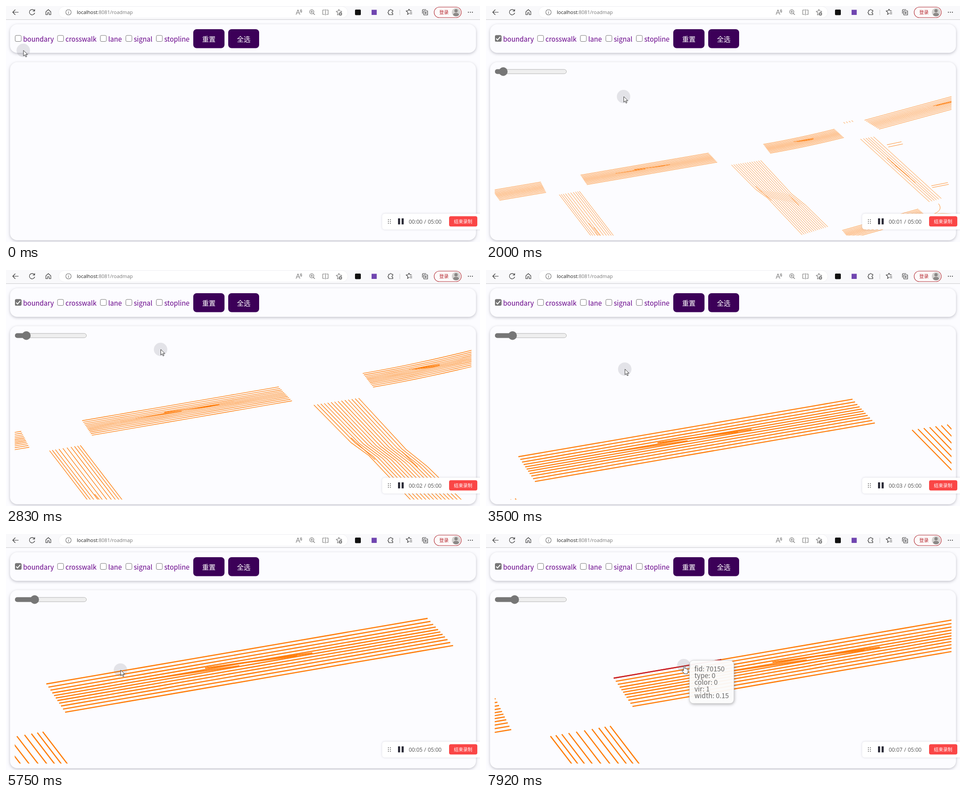
These frames come from a looping animation (1058x529 px, 8000 ms). An HTML page:

```html
<!DOCTYPE html>
<html lang="zh-CN">
<head>
<meta charset="utf-8">
<title>roadmap</title>
<style>
html, body { margin: 0; width: 100%; height: 100%; overflow: hidden; background: #fcfcff; }
svg { display: block; width: 1058px; height: 529px; }
text { font-family: "Noto Sans CJK SC", "Noto Sans", sans-serif; white-space: pre; }
.ui { font-family: "Open Sans", "Noto Sans", sans-serif; }
.panel { fill: #fcfcff; filter: drop-shadow(0 2px 3px rgba(40, 40, 60, .28)); }
.label { font-size: 15px; fill: #660088; }
.button { fill: #3c0058; }
.icon { fill: none; stroke: #333; stroke-width: 1.15; stroke-linecap: round; stroke-linejoin: round; }
.soft { stroke: #777; }
.box { fill: #fff; stroke: #767676; }
#roads { fill: none; stroke: #ff7f0e; stroke-width: .88; }
#tip rect { fill: #fff; fill-opacity: .94; stroke: #ccc; stroke-width: .7; filter: drop-shadow(1px 2px 3px rgba(0, 0, 0, .3)); }
#tip text { font-size: 15px; fill: #666; }
</style>
</head>
<body>
<svg viewBox="0 0 1058 529">
  <defs><clipPath id="mapArea"><rect x="19.5" y="158" width="1019.5" height="356.5"/></clipPath></defs>

  <rect width="1058" height="30" fill="#f9f9fb"/>
  <path d="M0 30.5H1058" stroke="#c9c9cc"/>
  <rect x="117.5" y="1" width="645.5" height="26" rx="13" fill="#fff" stroke="#f0f0f2"/>
  <g class="icon">
    <path d="M27.5 14H15.5M20.5 8.5 15 14l5.500 5.500"/>
    <path d="M63.5 11A6 6 0 1 0 64 15.5M64 7.500v4h-4"/>
    <path d="M89 13l5.500-5 5.500 5v6.500h-3.700v-4.500h-3.600v4.500H89z"/>
    <g class="soft">
      <circle cx="139.5" cy="14" r="6"/>
      <path d="M139.5 13.300v3.700M139.500 11v.1"/>
      <path d="M647.5 19l4.200-10.500L656 19M649 15.500h5.500M656.500 9q2 2 1 5M658.500 7.500q2.500 3 1 7"/>
      <circle cx="682.5" cy="13" r="4.700"/>
      <path d="M686 16.500l3 3M680 13h5M682.500 10.500v5"/>
      <path d="M711 9h-4v10h4M715 9h4v10h-4M713 7.500v13"/>
      <path d="M745 19l-5.500 1 1.500-4.500-4-3.500 4.500-.7L743 7.500l2 3.800 4.500.7-2 2"/>
    </g>
    <path d="M854 9.500h3q0-2 1.700-2t1.700 2h3v3q-2 0-2 2t2 2v3h-9v-3q-1.800 0-1.800-2t1.800-2z"/>
    <path d="M900 16.500l-4 2.500 1-4.500-4-3.500 4.500-.5 2-3.500 2 3.500H905M902 14h4M902 17.500h4"/>
    <path d="M929.5 16.500v-7q0-1.500 1.500-1.500h6.500M932.500 11h8.500v9h-8.500zM936.700 13.300v4.400M934.500 15.500h4.400"/>
  </g>
  <circle cx="746.5" cy="17.8" r="3.7" fill="#777"/>
  <path d="M744.5 17.800h4M746.500 15.800v4" stroke="#fff"/>
  <rect x="779" y="8" width="13" height="12.5" rx="2" fill="#111"/>
  <rect x="816" y="8.5" width="11.5" height="11.5" fill="#7045b0"/>
  <path d="M879 8.500v12" stroke="#ccc"/>
  <rect x="955.7" y="2.5" width="60.5" height="23.5" rx="11.7" fill="#fdfafa" stroke="#b5343c" stroke-width="1.2"/>
  <text x="967" y="18" font-size="10.5" fill="#b5262e">登录</text>
  <circle cx="1004.5" cy="14" r="9.5" fill="#d4d2d0"/>
  <path d="M998 20.500q0-5 6.500-5t6.500 5q-6 5-13 0" fill="#8a8886"/>
  <circle cx="1004.5" cy="10.8" r="3.7" fill="#8a8886"/>
  <path d="M1032 14h.1M1036.500 14h.1M1041 14h.1" stroke="#333" stroke-width="2.2" stroke-linecap="round"/>
  <text class="ui" x="158" y="18" font-size="11" fill="#222">localhost<tspan fill="#777">:8081/roadmap</tspan></text>

  <rect class="panel" x="9" y="41" width="1040" height="64" rx="16"/>
  <rect class="panel" x="9" y="126" width="1040" height="399" rx="16"/>
  <g id="checks"></g>
  <g id="tick">
    <rect x="20" y="65.5" width="14.5" height="14.5" rx="2.5" fill="#767676"/>
    <path d="M22.8 73l3 3.200 6-7" fill="none" stroke="#fff" stroke-width="2"/>
  </g>
  <rect class="button" x="418" y="52" width="69.7" height="42.4" rx="7.5"/>
  <rect class="button" x="496" y="52" width="69" height="42.4" rx="7.5"/>
  <g font-size="15" fill="#fff"><text x="437.8" y="79.5">重置</text><text x="515.5" y="79.5">全选</text></g>

  <g id="view">
    <rect x="20.5" y="142.2" width="159" height="9.6" rx="4.8" fill="#efefef" stroke="#b2b2b2"/>
    <rect id="fill" x="20" y="141.7" height="10.6" rx="5" fill="#767676"/>
    <circle id="knob" cy="147" r="9.7" fill="#767676"/>
    <g clip-path="url(#mapArea)"><g id="roads"></g></g>
  </g>

  <g id="tip"><rect width="99" height="96.5" rx="9"/></g>

  <rect x="839.5" y="465.5" width="230" height="35.5" rx="6" fill="#fff" style="filter:drop-shadow(0 0 2px rgba(60,60,90,.2))"/>
  <path d="M853.5 479h.1M858 479h.1M853.5 483h.1M858 483h.1M853.5 487h.1M858 487h.1" stroke="#555" stroke-width="1.9" stroke-linecap="round"/>
  <path d="M875 476h4.700v13.500H875zM883 476h4.700v13.500H883z" fill="#2c2c38"/>
  <g class="clock" font-size="12" fill="#555"><text class="ui" id="clock" x="899" y="487.5"></text><text class="ui" x="933.3" y="487.5">/</text><text class="ui" x="941.5" y="487.5">05:00</text></g>
  <rect x="989" y="471.3" width="63" height="23" rx="4" fill="#fa4646"/>
  <text x="999.7" y="487" font-size="10.3" fill="#fff">结束录制</text>

  <g id="pointer">
    <circle r="15" fill="#787884" fill-opacity=".19"/>
    <path id="arrow" d="M.5 0V12.500l3-2.700 2.200 5 2-.9-2.200-4.800h4z" fill="#fff" stroke="#222" stroke-width=".9"/>
    <path id="hand" d="M-.5 1.500q1.500-1.500 2.800 0v5q2.200-.8 2.600.7 2-.4 2.500.9 2-.2 2.100 1.400v3.500q0 2-1.500 4v1.300H.7V17Q-1.500 15-4 11q.7-1.800 3.500.5z" fill="#fff" stroke="#222" stroke-width=".9"/>
  </g>
</svg>
<script>
const $ = id => document.getElementById(id);
const mix = (a, b, u) => a + (b - a) * u;
const progress = (t, from, to) => Math.min(1, Math.max(0, (t - from) / (to - from)));
const add = (parent, tag, attrs, text = '') => {
  const el = document.createElementNS('http://www.w3.org/2000/svg', tag);
  for (const key in attrs) el.setAttribute(key, attrs[key]);
  el.textContent = text;
  return parent.appendChild(el);
};
let seed = 7;
const random = (from, to) => {
  seed = seed * 16807 % 2147483647;
  return mix(from, to, seed / 2147483647);
};

Object.entries({ boundary: 20, crosswalk: 114.5, lane: 210, signal: 267, stopline: 335 }).forEach(([name, x]) => {
  add($('checks'), 'rect', { class: 'box', x: x + .5, y: 66, width: 13.5, height: 13.5, rx: 2.5 });
  add($('checks'), 'text', { class: 'label', x: x + 18.3, y: 79.5 }, name);
});
['fid: 70150', 'type: 0', 'color: 0', 'vir: 1', 'width: 0.15'].forEach((line, i) =>
  add($('tip'), 'text', { x: 11, y: 24.7 + i * 15 }, line));

const draw = (d, attrs) => add($('roads'), 'path', { d, ...attrs });

// A road runs along (dx, dy) and is (wx, wy) wide; u goes along it, v across.
function road(x, y, dx, dy, wx, wy, { lanes = 11, grow = 1, bend = 0, spread = .02, drifts = 3 } = {}) {
  const point = (u, v) => {
    const along = u * mix(1, grow, v);
    return `${x + dx * along + wx * v} ${y + dy * along + wy * v + bend * 4 * u * (1 - u)}`;
  };
  const line = (u0, v0, u1, v1, attrs) => {
    const points = Array.from({ length: 9 }, (_, i) => point(mix(u0, u1, i / 8), mix(v0, v1, i / 8)));
    return draw('M' + points.join('L'), attrs);
  };
  for (let i = 0; i < lanes; i++) {
    const u = i / (lanes - 1), v = u + spread * Math.sin(2 * Math.PI * u);
    line(0, v, 1, v);
  }
  for (let i = 0; i < drifts; i++) {
    const u = random(.25, .45), v = random(.3, .42);
    line(u, v, u + random(.2, .3), v + random(.05, .13));
  }
  return line;
}

road(14, 413, 108.5, -18.5, 16, 22.5, { grow: .96, drifts: 0 });
const mainLine = road(211, 379, 286, -49.4, 14.1, 21.3, { grow: 1.0175 });
road(619, 310, 159, -34, 15, 20, { grow: 1.037, bend: 1.6 });
road(845, 256, 340, -93, 32, 20);
road(795, 503, 170, -48, 16, 19, { lanes: 10, grow: 1.024 });
road(163.6, 422.7, 153, 200, 44.7, -7.7, { lanes: 10, spread: -.033 });
road(836, 298, 154, 141, 29, -5, { lanes: 6, grow: .983 });

// The wide street widens at a kink, so its lanes blend two edges.
const leftEdge = [548, 356, 602, 411, 628, 430, 706, 513];
const rightEdge = [613, 346, 682, 421, 713, 446, 763, 495];
for (let i = 0; i < 14; i++) draw('M' + leftEdge.map((n, j) => mix(n, rightEdge[j], i / 13)).join(' '));
draw('M602 404L637 436M676 424L699 447');

for (let i = 0; i < 4; i++) draw(`M${798 + i * 6} ${260.5 - i * 1.3}l3.5 2.8`);
for (let i = 0; i < 2; i++) {
  draw(`M${895 + i * 3} ${311 + i * 5}l32.5 -6.800`);
  draw(`M${994 + i * 2} ${403 + i * 4}l37 -7.300`);
}
draw('M1010 443Q1021 457 1000 466M998 467Q1015 463 1045 467');

// Outlying blocks, visible only when zoomed out.
for (let i = 0; i < 4; i++) {
  road(1260 + i * 305, 140 - i * 52, 260, -45, 16, 22);
  road(-420 + i * 360, 745 - i * 55, 300, -52, 16, 22);
  road(1300 + i * 280, 230 - i * 40, 150, 200, 45, -8, { lanes: 10 });
}
road(-470, 497, 400, -69, 16, 22);
const hot = mainLine(0, 0, .282, 0, { stroke: '#c81e2c' });

// Each gesture zooms about a point, then drags the map from there.
const minZoom = .341;
const gestures = [
  { at: [290, 300], factor: 1 / minZoom, zoom: [1250, 1667], move: [17, -97], dragged: 1917 },
  { at: [325, 275], factor: 1.535, zoom: [2167, 2583], move: [20, -97], dragged: 2833 },
  { at: [309.7, 222.2], factor: 1.9388, zoom: [3167, 3583], move: [51.2, -110.1], dragged: 3916 },
  { at: [246.5, 308], factor: 1, zoom: [5917, 7500], move: [195, -13], dragged: 7916 }
];
const end = ({ at, move }) => [at[0] + move[0], at[1] + move[1]];

function mapView(t) {
  let k = minZoom, x = 185.3, y = 230.8;
  for (const { at, factor, zoom, move, dragged } of gestures) {
    const f = factor ** progress(t, ...zoom), u = progress(t, zoom[1], dragged);
    k *= f;
    x = at[0] + (x - at[0]) * f + move[0] * u;
    y = at[1] + (y - at[1]) * f + move[1] * u;
  }
  return { k, x, y };
}

// The pointer visits the checkbox, then every gesture, resting in between.
const stops = [
  [0, 38.5, 99.5], [330, 31, 67], [1000, 35, 74],
  [4600, 272, 293], [5420, 255.5, 305], [5750, 255.5, 305],
  ...gestures.flatMap(g => [
    [g.zoom[0], ...g.at], [g.zoom[1], ...g.at], [g.dragged, ...end(g)], [g.dragged + 84, ...end(g)]
  ])
].sort((a, b) => a[0] - b[0]);
function pointerAt(t) {
  const i = Math.max(1, stops.findIndex(stop => stop[0] >= t));
  const [from, x0, y0] = stops[i - 1], [to, x1, y1] = stops[i], u = progress(t, from, to);
  return [mix(x0, x1, u), mix(y0, y1, u)];
}

const show = (id, on) => $(id).style.display = on ? '' : 'none';
function render(now) {
  const t = Math.floor((now % 8000 + 4) * .012) / .012 % 8000;
  const { k, x, y } = mapView(t), [px, py] = pointerAt(t);
  const knob = 30 + (k - minZoom) / .0776;
  show('tick', t >= 410);
  show('view', t >= 410);
  show('arrow', t < 5900);
  show('hand', t >= 5900);
  $('roads').setAttribute('transform', `matrix(${k} 0 0 ${k} ${x} ${y})`);
  $('knob').setAttribute('cx', knob);
  $('fill').setAttribute('width', knob - 20);
  $('pointer').setAttribute('transform', `translate(${px} ${py})`);
  $('tip').setAttribute('transform', `translate(${px + 12.7} ${py - 11.7})`);
  $('tip').style.opacity = progress(t, 5830, 6917);
  hot.style.opacity = progress(t, 6000, 6700);
  $('clock').textContent = '00:0' + Math.max(0, Math.floor((t - 80) / 1000));
  requestAnimationFrame(render);
}
requestAnimationFrame(render);
</script>
</body>
</html>
```
